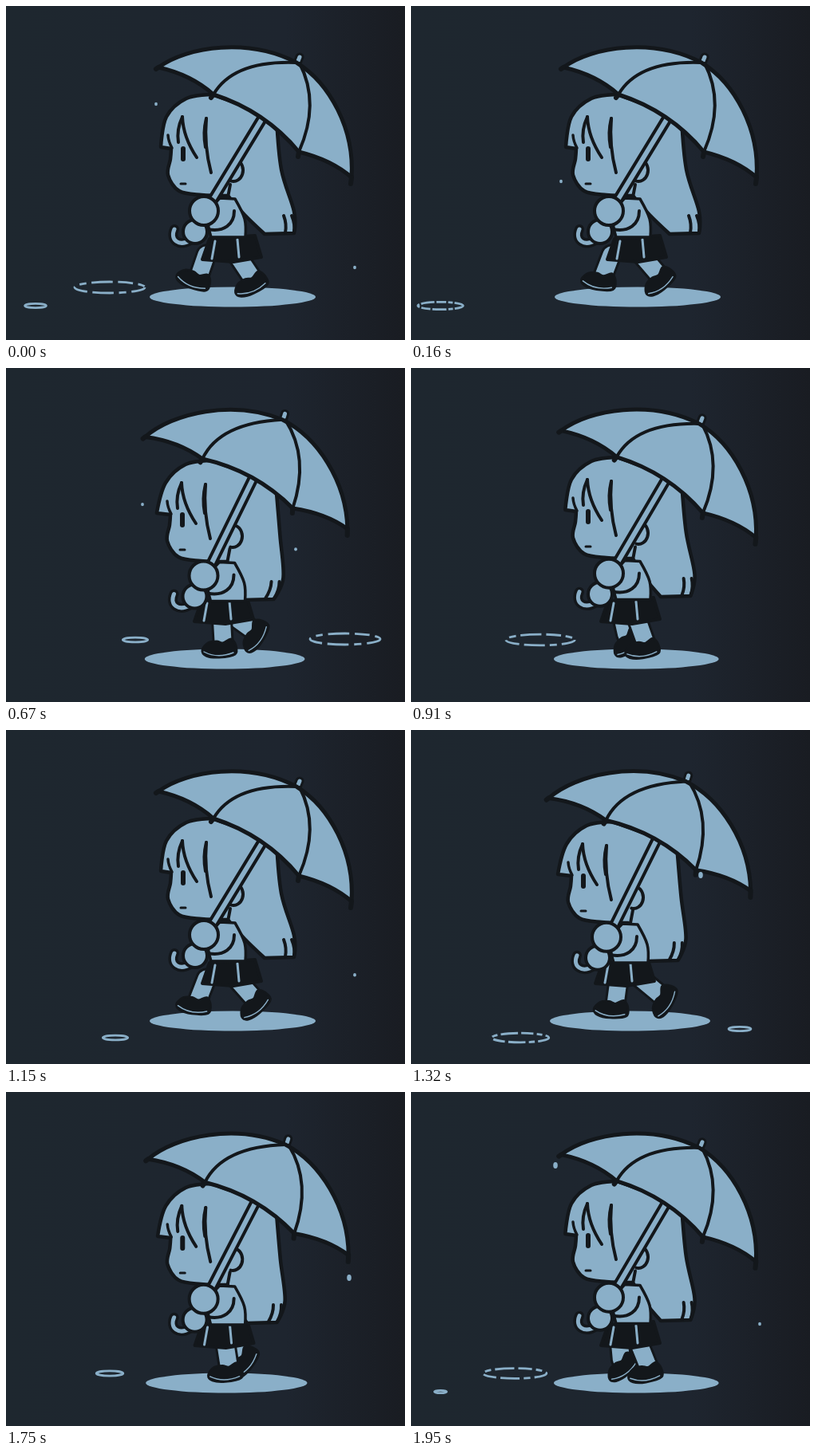
An HTML page with a canvas for the animation above (2 s loop, 500 by 419 pixels).

```html
<!DOCTYPE html>
<html lang="en">
<head>
<meta charset="utf-8">
<title>Walk in the rain</title>
<style>
html, body { margin: 0; width: 100%; height: 100%; overflow: hidden; background: #1e252e; }
canvas { display: block; }
</style>
</head>
<body>
<canvas id="stage" width="500" height="419"></canvas>
<script>
const ctx = document.getElementById('stage').getContext('2d');
const BLUE = '#8aafc8', INK = '#13171b', LOOP = 2000, STEP = LOOP / 2;

// Upper body: umbrella tilt in degrees, head offset, hair swing, skirt shift
const back = { tilt: 0, dx: 0, dy: 0, hair: 0, skirt: 0 };
const front = { tilt: -5, dx: -6, dy: 4, hair: -21, skirt: -15 };
const rise = { tilt: -5.2, dx: -1, dy: 5, hair: -25, skirt: -10 };
const pass = { tilt: -0.9, dx: 0, dy: 1, hair: -11, skirt: -8 };
const sway = [[0, back], [160, back], [325, front], [545, front], [670, rise],
  [905, pass], [955, pass], [STEP, back]];

// Foot: x, y, tilt in degrees; the other foot runs one step later
const foot = (x, y, deg) => ({ x, y, deg });
const stride = [
  [0, foot(235, 342, 22)], [150, foot(235, 344, 10)], [330, foot(251, 349, 6)],
  [670, foot(267, 351, 0)], [950, foot(293, 352, -7)], [STEP, foot(306, 349, -22)],
  [1330, foot(316, 340, -58)], [1670, foot(311, 336, -55)], [1950, foot(264, 345, -36)],
  [LOOP, foot(235, 342, 22)]];

// Birth time and centre
const ripples = [[290,425,340], [560,162,341], [1040,137,386], [1230,412,375], [1630,130,353], [1910,37,376]];
// Landing time, x, height it hangs at
const drops = [[829,363,182], [905,171,92], [1201,437,233], [1638,370,182], [2023,437,233], [2300,188,92]];
// Picture changes: first, last, count
const runs = [[80,590,11], [630,1150,14], [1200,1700,13], [1750,1950,5]];

const lerp = (a, b, k) => a + (b - a) * k;
const smooth = k => k * k * (3 - 2 * k);

function blend(keys, t, ease = k => k) {
  const i = keys.findIndex(key => key[0] > t);
  const [t0, a] = keys[i - 1], [t1, b] = keys[i];
  const k = ease((t - t0) / (t1 - t0)), out = {};
  for (const name in a) out[name] = lerp(a[name], b[name], k);
  return out;
}

function stepTime(t) {
  let out = 0;
  for (const [a, b, n] of runs) {
    if (t < a) break;
    const step = (b - a) / (n - 1);
    out = a + Math.min(n - 1, Math.floor((t - a) / step + 0.1)) * step;
  }
  return out;
}

function stroke(color, width) {
  ctx.strokeStyle = color;
  ctx.lineWidth = width;
  ctx.stroke();
}

function fill(color) {
  ctx.fillStyle = color;
  ctx.fill();
}

function line(x1, y1, x2, y2, color, width) {
  ctx.beginPath();
  ctx.moveTo(x1, y1);
  ctx.lineTo(x2, y2);
  stroke(color, width);
}

function oval(x, y, rx, ry, from = 0, to = Math.PI * 2) {
  ctx.beginPath();
  ctx.ellipse(x, y, rx, ry, 0, from, to);
}

// Smooth closed path through points, sharp at the listed corners
function outline(p, corners = []) {
  const n = p.length, at = i => p[(i + n) % n];
  const slope = (i, d) => corners.includes(i % n) ? 0 : (at(i + 1)[d] - at(i - 1)[d]) / 6;
  ctx.beginPath();
  ctx.moveTo(...p[0]);
  for (let i = 0; i < n; i++) {
    const a = p[i], b = at(i + 1), j = i + 1;
    ctx.bezierCurveTo(a[0] + slope(i, 0), a[1] + slope(i, 1), b[0] - slope(j, 0), b[1] - slope(j, 1), ...b);
  }
  ctx.closePath();
}

function drawRipple([birth, x, y], t) {
  const age = (t - birth + LOOP) % LOOP;
  if (age > 400) return;
  const rx = Math.min(44, 3 + age * 0.115);
  const gap = Math.max(0, age - 140) / 35;
  oval(x, y, rx, 0.6 + rx * 0.145);
  if (gap) ctx.setLineDash([rx * 0.42, gap, rx * 0.2, gap, rx * 0.6, gap]);
  ctx.lineCap = 'butt';
  stroke(BLUE, 2.8);
  ctx.lineCap = 'round';
  ctx.setLineDash([]);
}

function drawDrop([land, x, top], t) {
  if (land - t > LOOP) t += LOOP;
  const y = 345 - 0.74 * (land - t);
  if (y > 345 || y < top - 100) return;
  if (y > top) oval(x, y, 1.9, 2.2);
  else oval(x - 7, top, 2.8, 4);
  fill(BLUE);
}

function drawLeg({ x, y, deg }) {
  const tilt = deg * Math.PI / 180, c = Math.cos(tilt), s = Math.sin(tilt);
  const hip = 275 + (x - 275) * 0.6 + Math.min(0, deg) * 0.2;
  for (const [color, width] of [[INK, 27], [BLUE, 21]])
    line(hip, 312, x + 5 * c + 8 * s, y + 5 * s - 8 * c, color, width);
  ctx.save();
  ctx.translate(x, y);
  ctx.rotate(tilt);
  outline([[-21,3], [-14,-6], [-3,-8], [5,-6], [15,-11], [21,-3], [20,8], [0,12], [-16,10]]);
  fill(INK);
  stroke(INK, 3);
  ctx.beginPath();
  ctx.moveTo(-19, 5);
  ctx.quadraticCurveTo(-2, 14, 18, 6);
  stroke(BLUE, 1.4);
  ctx.restore();
}

function drawSkirt(shift) {
  ctx.save();
  ctx.translate(shift, 0);
  outline([[255,292], [312,288], [320,315], [285,321], [246,318]], [0, 1, 2, 3, 4]);
  fill(INK);
  stroke(INK, 4);
  line(262, 295, 258, 317, BLUE, 3);
  line(290, 293, 292, 315, BLUE, 3);
  ctx.restore();
}

// Start, offset to the end, sideways bend, width
const strands = [
  [203,162, 5,16, -2,3.5], [221,139, -5,32, -5,4], [221,139, 18,51, -8,4],
  [222,179, 0,13, 0,6], [251,141, 6,68, -6,4], [251,141, -1,36, -4,4],
  [219,223, 6,0, 0,3], [348,263, 2,21, 3,4], [358,263, 3,21, 3,4]];

function drawHead({ tilt, dx, dy, hair }) {
  const place = (x, y) => {
    if (x > 290 && y > 190) x += hair * ((y - 190) / 96) ** 2;
    if (x < 200) x += tilt * 0.8;
    return [x + dx, y + dy];
  };
  const head = [[258,111], [226,116], [201,139], [194,177], [207,179], [206,192], [203,212], [217,232],
    [245,237], [278,238], [299,262], [324,286], [361,285], [361,258], [345,205], [339,140]];
  outline(head.map(p => place(...p)), [0, 3, 4, 9, 11, 12, 15]);
  fill(BLUE);
  stroke(INK, 4.5);
  oval(285 + dx, 206 + dy, 12, 14, -1.2, 1.8);
  stroke(INK, 4);
  for (const [x, y, ex, ey, bend, width] of strands) {
    ctx.beginPath();
    ctx.moveTo(...place(x, y));
    ctx.quadraticCurveTo(...place(x + ex / 2 + bend, y + ey / 2), ...place(x + ex, y + ey));
    stroke(INK, width);
  }
}

function drawTorso({ dx, dy }) {
  ctx.save();
  ctx.translate(dx / 2, dy / 2);
  outline([[268,241], [287,242], [299,267], [300,290], [257,290], [253,262]], [0, 1, 3, 4]);
  fill(BLUE);
  stroke(INK, 3.5);
  line(281, 224, 278, 240, INK, 4);
  ctx.beginPath();
  ctx.moveTo(286, 257);
  ctx.bezierCurveTo(286, 274, 273, 284, 253, 280);
  stroke(INK, 4);
  ctx.restore();
}

// Drawn around the upper hand as a rigid shape
function drawUmbrella(tilt) {
  ctx.save();
  ctx.rotate(tilt * Math.PI / 180);
  line(75, -119, 10, -12, INK, 14);
  line(75, -119, 10, -12, BLUE, 6);
  line(118, -188, 120, -193, INK, 11);
  line(118, -188, 120, -193, BLUE, 5);

  ctx.beginPath();
  ctx.moveTo(-57, -180);
  ctx.bezierCurveTo(-20, -207, 57, -217, 116, -186);
  ctx.bezierCurveTo(158, -160, 189, -102, 185, -42);
  ctx.quadraticCurveTo(160, -64, 119, -74);
  ctx.quadraticCurveTo(77, -125, 12, -146);
  ctx.quadraticCurveTo(-16, -171, -57, -180);
  fill(BLUE);
  stroke(INK, 5);
  ctx.beginPath();
  ctx.moveTo(12, -146);
  ctx.quadraticCurveTo(37, -189, 116, -186);
  ctx.moveTo(120, -185);
  ctx.quadraticCurveTo(146, -135, 119, -74);
  stroke(INK, 4);
  line(-57, -180, -60, -178, INK, 6);
  line(12, -146, 9, -142, INK, 6);
  line(119, -74, 118, -68, INK, 6);
  line(185, -42, 184, -34, INK, 6);
  ctx.restore();
}

function drawHands() {
  ctx.beginPath();
  ctx.moveTo(-17, 37);
  ctx.bezierCurveTo(-31, 45, -43, 37, -37, 23);
  stroke(INK, 12);
  stroke(BLUE, 5);
  for (const [x, y, r] of [[-11, 26, 15], [0, 0, 18]]) {
    oval(x, y, r, r);
    fill(BLUE);
    stroke(INK, 4);
  }
}

function draw(t) {
  const bg = ctx.createLinearGradient(0, 0, 500, 0);
  bg.addColorStop(0, '#1e272f');
  bg.addColorStop(0.7, '#1e252f');
  bg.addColorStop(1, '#191c22');
  ctx.fillStyle = bg;
  ctx.fillRect(0, 0, 500, 419);
  ctx.lineCap = ctx.lineJoin = 'round';

  const pose = blend(sway, t % STEP, smooth);
  const feet = [t, t + STEP].map(time => blend(stride, time % LOOP));
  ripples.forEach(r => drawRipple(r, t));
  oval(284 + pose.tilt * 1.9, 365, 104 + pose.tilt * 0.7, 12.5);
  fill(BLUE);
  feet.sort((a, b) => a.y - b.y).forEach(drawLeg);
  drawSkirt(pose.skirt);
  drawHead(pose);
  drawTorso(pose);
  ctx.save();
  ctx.translate(248 + pose.dx / 2, 257 + pose.dy * 0.7);
  drawUmbrella(pose.tilt);
  drawHands();
  ctx.restore();
  drops.forEach(d => drawDrop(d, t));
}

const begin = performance.now();
function tick() {
  draw(stepTime((performance.now() - begin) % LOOP));
  requestAnimationFrame(tick);
}
tick();
</script>
</body>
</html>
```
